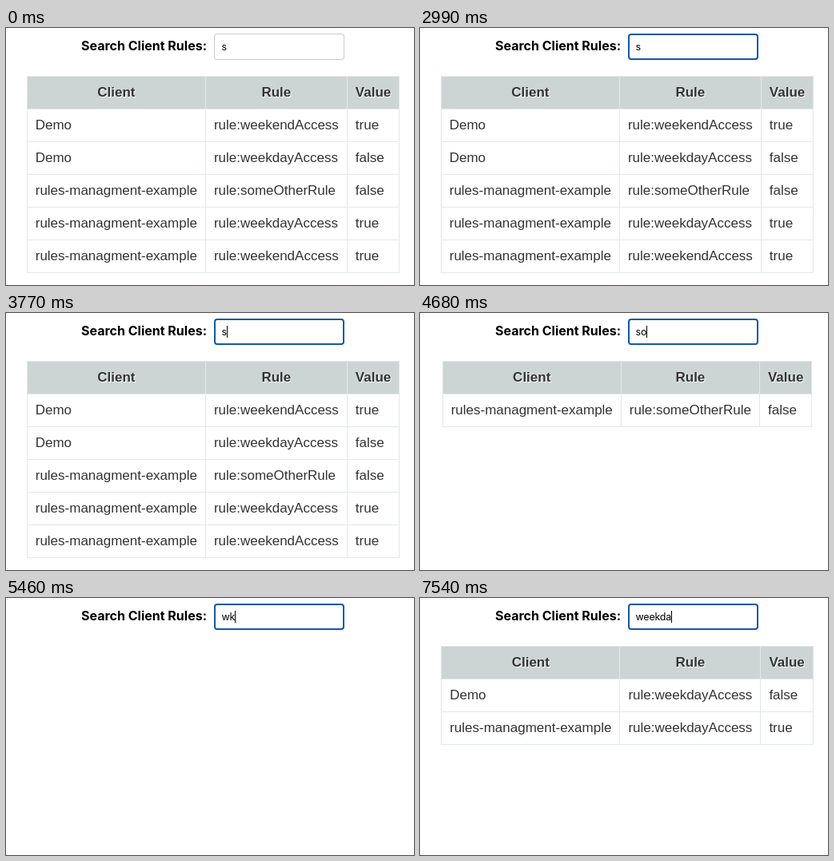
An HTML page for the animation above (8 s loop, 510 px wide and 322 px high).

```html
<!DOCTYPE html>
<html lang="en">
<head>
<meta charset="utf-8">
<title>Search Client Rules</title>
<style>
  html, body { margin: 0; width: 100%; height: 100%; overflow: hidden; background: #fff; }
  label {
    position: absolute; right: calc(100% - 251px); top: 12px;
    font: 700 16px/20px Inter, sans-serif; color: #000; white-space: nowrap;
  }
  #field {
    position: absolute; left: 260px; top: 7px; width: 163px; height: 33px;
    box-sizing: border-box; border-radius: 4px; box-shadow: inset 0 0 0 1px #ccc;
    padding-left: 9.5px; display: flex; align-items: center;
    font: 12.5px/16px Inter, sans-serif; letter-spacing: -.2px; color: #000;
  }
  #field.focus { box-shadow: inset 0 0 0 2px #1458a6; }
  #caret { width: 1px; height: 15px; background: #000; }
  #stage { position: absolute; left: 8px; top: 60px; width: 502px; }
  table {
    margin: 0 auto; border-collapse: collapse;
    font: 17px/20px "Liberation Sans", Arial, sans-serif; color: #333;
  }
  th, td { padding: 10px; border: 1px solid #e2e8e8; white-space: nowrap; text-align: left; }
  th { background: #cdd5d4; text-align: center; text-shadow: 1px 1px 1px #fff; }
</style>
</head>
<body>
<label>Search Client Rules:</label>
<div id="field"><span id="query"></span><span id="caret"></span></div>
<div id="stage">
  <table>
    <thead><tr><th>Client</th><th>Rule</th><th>Value</th></tr></thead>
    <tbody></tbody>
  </table>
</div>
<script>
const LOOP = 8000, FOCUS_AT = 1430;
const rules = [
  ["Demo", "rule:weekendAccess", "true"],
  ["Demo", "rule:weekdayAccess", "false"],
  ["rules-managment-example", "rule:someOtherRule", "false"],
  ["rules-managment-example", "rule:weekdayAccess", "true"],
  ["rules-managment-example", "rule:weekendAccess", "true"],
];
// [start in ms, field text, caret shown]
const steps = [
  [0, "s", 0], [1430, "s", 1], [1950, "s", 0], [2470, "s", 1], [2990, "s", 0],
  [3380, "so", 1], [3770, "s", 1], [3900, "so", 1], [4030, "som", 1], [4160, "some", 1],
  [4680, "so", 1], [4810, "s", 1], [4940, "", 1], [5200, "", 0],
  [5460, "wk", 1], [5590, "wke", 1], [5980, "wk", 1], [6110, "w", 0],
  [6240, "we", 1], [6370, "week", 1], [6890, "week", 0],
  [7280, "weekd", 1], [7540, "weekda", 1],
];
const $ = s => document.querySelector(s);
const field = $("#field"), query = $("#query"), caret = $("#caret");
const table = $("table"), body = $("tbody");
let current;

function show(step) {
  const [start, text, blink] = step;
  field.classList.toggle("focus", start >= FOCUS_AT);
  query.textContent = text;
  caret.hidden = !blink;
  caret.style.visibility = blink ? "visible" : "hidden";
  const found = rules.filter(row => row.some(cell => cell.includes(text)));
  table.style.display = found.length ? "" : "none";
  body.innerHTML = found
    .map(row => `<tr>${row.map(cell => `<td>${cell}</td>`).join("")}</tr>`)
    .join("");
}

function tick() {
  const t = performance.now() % LOOP;
  const step = steps.findLast(([start]) => start <= t);
  if (step !== current) show(current = step);
  requestAnimationFrame(tick);
}
tick();
</script>
</body>
</html>
```
